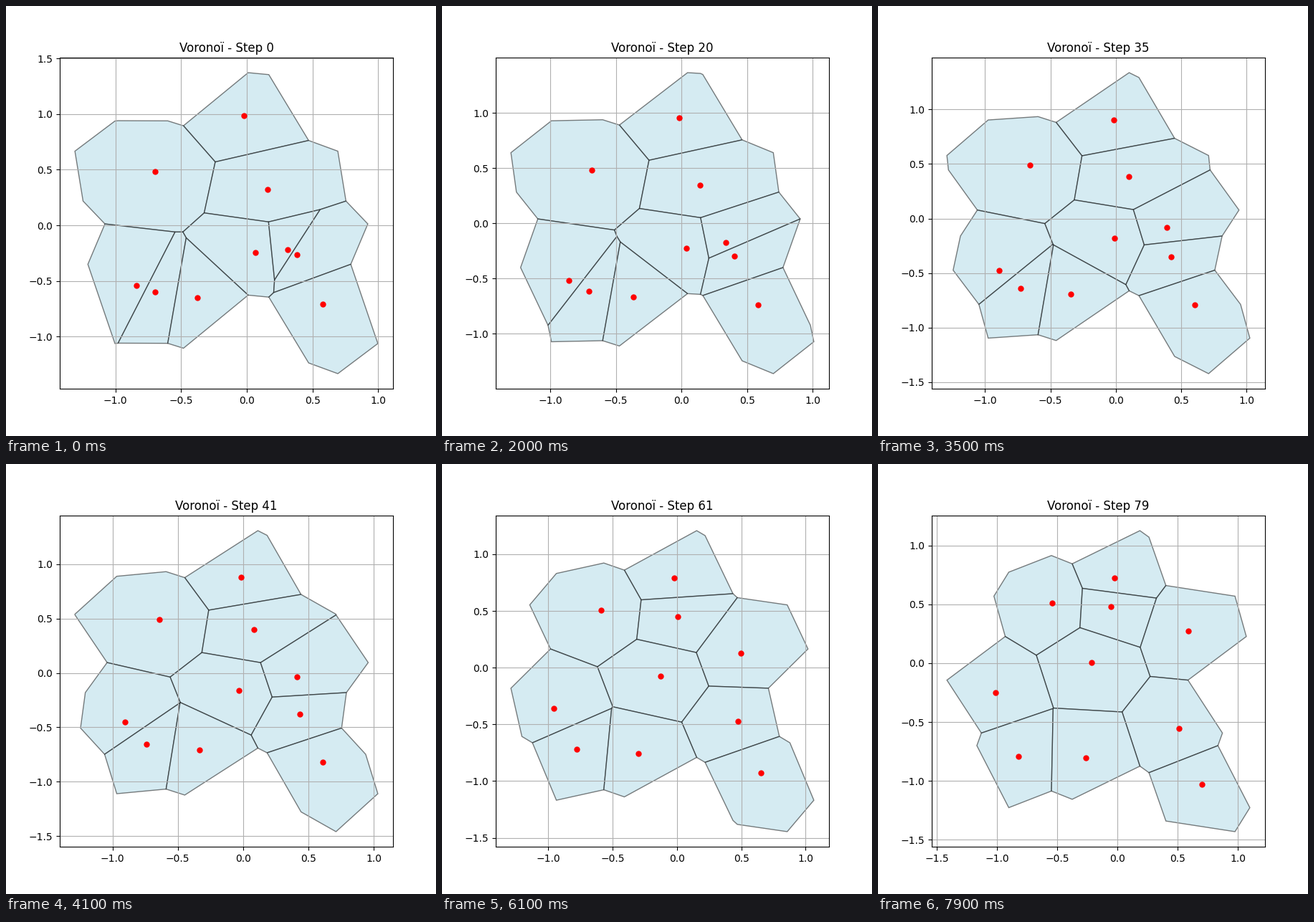
Animation of 600x600 px, one loop 8 s. Source, as a matplotlib script:

```python
import numpy as np
import matplotlib.pyplot as plt
from matplotlib.animation import FuncAnimation

STEPS = 80
PERIOD = 2.0      # the plane is a torus of side 2
DT = 0.01
STIFFNESS = 10.0  # energy is STIFFNESS / 2 * sum(area**2)

START = np.array([
    (-.022, .985), (-.700, .480), (.158, .322), (.065, -.243), (.3115, -.2215),
    (.384, -.261), (.578, -.708), (-.838, -.5395), (-.696, -.601), (-.378, -.648),
])
SHIFTS = [(i * PERIOD, j * PERIOD) for i in (-1, 0, 1) for j in (-1, 0, 1)]


def clip(poly, a, b, c, label):
    """Keep a*x + b*y <= c; each vertex carries the label of its outgoing edge."""
    side = [a * x + b * y - c for x, y, _ in poly]
    if max(side) <= 0:
        return poly
    out = []
    for i, (x1, y1, edge1) in enumerate(poly):
        x0, y0, edge0 = poly[i - 1]
        s0, s1 = side[i - 1], side[i]
        if (s0 <= 0) != (s1 <= 0):
            u = s0 / (s0 - s1)
            out.append((x0 + u * (x1 - x0), y0 + u * (y1 - y0),
                        label if s0 <= 0 else edge0))
        if s1 <= 0:
            out.append((x1, y1, edge1))
    return out


def cell(site, images):
    """Voronoi cell of one site: its corners and the image behind each edge."""
    px, py = map(float, site)
    order = np.argsort(np.hypot(*(images - site).T))[1:]
    poly = [(px + sx * PERIOD, py + sy * PERIOD, -1)
            for sx, sy in ((-1, -1), (1, -1), (1, 1), (-1, 1))]
    for k in order:
        qx, qy = map(float, images[k])
        poly = clip(poly, qx - px, qy - py,
                    (qx * qx + qy * qy - px * px - py * py) / 2, k)
    return np.array([v[:2] for v in poly]), [v[2] for v in poly]


def area(poly):
    x, y = poly.T
    return (x @ np.roll(y, -1) - y @ np.roll(x, -1)) / 2


def forces(sites, images, cells):
    """Downhill gradient of the sum of squared areas: small cells push out."""
    areas = [area(poly) for poly, _ in cells]
    total = np.zeros_like(sites)
    for i, (poly, edges) in enumerate(cells):
        for a, b, k in zip(poly, np.roll(poly, -1, axis=0), edges):
            ratio = np.hypot(*(b - a)) / np.hypot(*(images[k] - sites[i]))
            gain = areas[k % len(sites)] - areas[i]
            total[i] += ratio * gain * ((a + b) / 2 - sites[i])
    return STIFFNESS * total


def diagram(sites):
    images = np.concatenate([sites + s for s in SHIFTS])
    return images, [cell(p, images) for p in sites]


def simulate():
    sites, velocity = START.copy(), np.zeros_like(START)
    images, cells = diagram(sites)
    history = []
    for _ in range(STEPS):
        velocity = velocity + DT * forces(sites, images, cells)
        sites = sites + DT * velocity
        images, cells = diagram(sites)
        history.append((sites, [poly for poly, _ in cells]))
    return history


history = simulate()
fig, ax = plt.subplots(figsize=(6, 6), dpi=100)


def draw(step):
    sites, polys = history[step]
    ax.clear()
    for poly in polys:
        ax.fill(*poly.T, facecolor="lightblue", edgecolor="black", alpha=0.5)
    ax.plot(*sites.T, "ro", markersize=5)
    ax.set_title(f"Voronoï - Step {step}")
    ax.grid(True)


anim = FuncAnimation(fig, draw, frames=STEPS, interval=100,
                     init_func=lambda: draw(0), repeat=True, repeat_delay=0)
plt.show()
```
